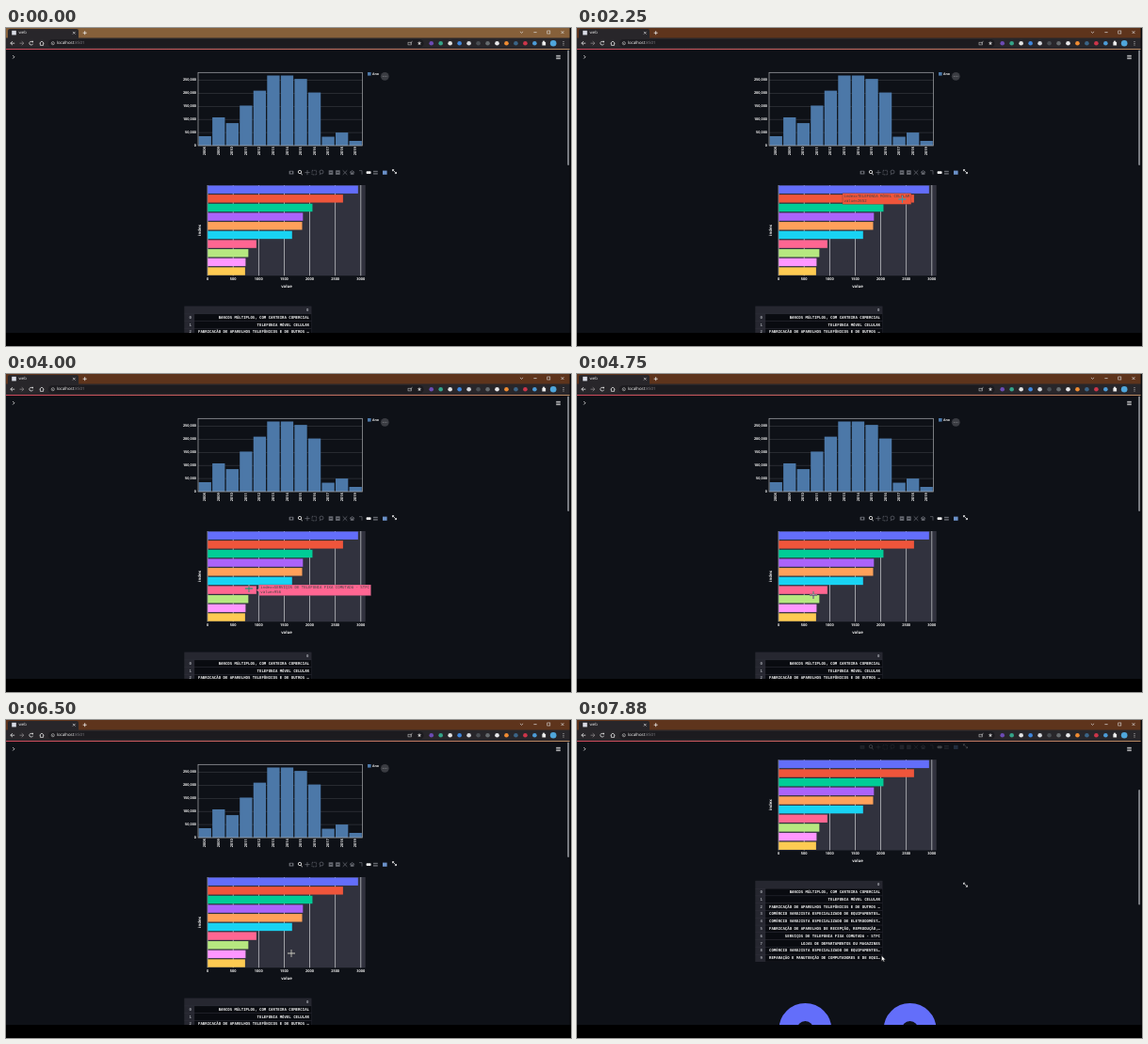
Animation, 600 px wide and 338 px high, one loop 8 s. Source, as an HTML page with a canvas:

```html
<!DOCTYPE html>
<html lang="pt">
<head>
<meta charset="utf-8">
<title>web</title>
<style>
html, body { margin: 0; width: 100%; height: 100%; overflow: hidden; background: #000; }
canvas { display: block; width: 600px; height: 338px; }
</style>
</head>
<body>
<canvas id="stage"></canvas>
<script>
const LOOP = 8000, STEP = 125;
const SANS = '"Open Sans", "Noto Sans", sans-serif';
const MONO = '"DejaVu Sans Mono", monospace';
const canvas = document.getElementById('stage');
const ctx = canvas.getContext('2d');
const dpr = window.devicePixelRatio || 1;
canvas.width = 600 * dpr;
canvas.height = 338 * dpr;
ctx.textRendering = 'geometricPrecision';

const SHOP = 'COMÉRCIO VAREJISTA ESPECIALIZADO DE ';
const MAKER = 'FABRICAÇÃO DE APARELHOS ';
const sectors = [
  ['BANCOS MÚLTIPLOS, COM CARTEIRA COMERCIAL', 2946, '#636efa'],
  ['TELEFONIA MÓVEL CELULAR', 2652, '#ef553b'],
  [MAKER + 'TELEFÔNICOS E DE OUTROS EQUIPAMENTOS DE COMUNICAÇÃO', 2054, '#00cc96'],
  [SHOP + 'EQUIPAMENTOS DE TELEFONIA E COMUNICAÇÃO', 1867, '#ab63fa'],
  [SHOP + 'ELETRODOMÉSTICOS E EQUIPAMENTOS DE ÁUDIO E VÍDEO', 1852, '#ffa15a'],
  [MAKER + 'DE RECEPÇÃO, REPRODUÇÃO, GRAVAÇÃO E AMPLIFICAÇÃO DE SOM', 1655, '#19d3f3'],
  ['SERVIÇOS DE TELEFONIA FIXA COMUTADA - STFC', 956, '#ff6692'],
  ['LOJAS DE DEPARTAMENTOS OU MAGAZINES', 799, '#b6e880'],
  [SHOP + 'EQUIPAMENTOS E SUPRIMENTOS DE INFORMÁTICA', 745, '#ff97ff'],
  ['REPARAÇÃO E MANUTENÇÃO DE COMPUTADORES E DE EQUIPAMENTOS PERIFÉRICOS', 735, '#fecb52']
];
// thousands per year from 2008
const counts = [36, 108, 86, 153, 210, 268, 268, 255, 203, 34, 50, 18];
// time, x, y
const mouseKeys = [
  [1000, 392, 215], [2000, 353, 181], [2750, 330, 184], [3250, 291, 199],
  [3625, 268, 221], [4000, 258, 228], [4500, 258, 211], [4750, 251, 235],
  [5250, 272, 258], [5875, 276, 222], [6500, 303, 248], [7250, 309, 245],
  [7875, 323.5, 250.5]
];
const wheelTimes = [6750, 7250, 7375, 7500];

const clamp01 = v => Math.min(1, Math.max(0, v));
const ease = v => { const k = clamp01(v); return k * k * (3 - 2 * k); };
const scrollAt = t => wheelTimes.reduce((sum, w) => sum + 31.2 * ease((t - w) / 250), 0);

function mouseAt(t) {
  const i = mouseKeys.findIndex(k => k[0] >= t);
  if (i < 1) return mouseKeys.at(i).slice(1);
  const [a, b] = [mouseKeys[i - 1], mouseKeys[i]];
  const k = (t - a[0]) / (b[0] - a[0]);
  return [a[1] + (b[1] - a[1]) * k, a[2] + (b[2] - a[2]) * k];
}

function rect(x, y, w, h, c) { ctx.fillStyle = c; ctx.fillRect(x, y, w, h); }
function round(x, y, w, h, r, c) {
  ctx.fillStyle = c;
  ctx.beginPath(); ctx.roundRect(x, y, w, h, r); ctx.fill();
}
function disc(x, y, r, c) {
  ctx.fillStyle = c;
  ctx.beginPath(); ctx.arc(x, y, r, 0, 7); ctx.fill();
}
function ring(x, y, r, c, w = 0.7, from = 0, to = 7) {
  ctx.strokeStyle = c; ctx.lineWidth = w;
  ctx.beginPath(); ctx.arc(x, y, r, from, to); ctx.stroke();
}
function box(x, y, w, h, c, lw = 0.7) {
  ctx.strokeStyle = c; ctx.lineWidth = lw; ctx.strokeRect(x, y, w, h);
}
// each path is a flat list of x,y pairs relative to (x, y)
function lines(x, y, c, w, ...paths) {
  ctx.strokeStyle = c; ctx.lineWidth = w;
  ctx.beginPath();
  for (const p of paths)
    for (let i = 0; i < p.length; i += 2)
      ctx[i ? 'lineTo' : 'moveTo'](x + p[i], y + p[i + 1]);
  ctx.stroke();
}
function plus(x, y, r, c, w = 0.8) { lines(x, y, c, w, [-r, 0, r, 0], [0, -r, 0, r]); }
function times(x, y, r, c, w = 0.7) { lines(x, y, c, w, [-r, -r, r, r], [r, -r, -r, r]); }
function dots(x, y, dx, dy, r, c) {
  for (let i = -1; i < 2; i++) disc(x + i * dx, y + i * dy, r, c);
}
function text(s, x, y, size, c, align = 'left', font = SANS, weight = 'bold') {
  ctx.font = `${weight} ${size}px ${font}`;
  ctx.fillStyle = c; ctx.textAlign = align; ctx.textBaseline = 'middle';
  ctx.fillText(s, x, y);
}
function upright(s, x, y, size, c) {
  ctx.save();
  ctx.translate(x, y); ctx.rotate(-Math.PI / 2);
  text(s, 0, 0, size, c, 'center');
  ctx.restore();
}
function expand(x, y) {
  lines(x, y, '#eee', 0.8, [-2, -2, 2, 2], [-2, -0.4, -2, -2, -0.4, -2], [2, 0.4, 2, 2, 0.4, 2]);
}

function yearChart() {
  for (let i = 0; i < 6; i++) {
    const y = 125 - i * 13.9;
    rect(204, y - 0.3, 174.5, 0.6, '#3a3d44');
    text(i ? i * 50 + ',000' : '0', 202, y, 3.8, '#eee', 'right');
  }
  counts.forEach((n, i) => {
    const x = 204 + i * 14.54;
    rect(x + 0.6, 125 - n * 0.278, 13.3, n * 0.278, '#4c78a8');
    upright(2008 + i, x + 7.3, 130.8, 3.9, '#eee');
  });
  box(204, 47.3, 174.5, 77.7, '#a9abb0');
  rect(384, 47, 3.6, 3.6, '#4c78a8');
  text('Ano', 389, 49, 3.6, '#eee');
  disc(402.3, 51.3, 4.4, '#3a3c42');
  dots(402.3, 51.3, 1.8, 0, 0.55, '#85878c');
}

function modebar() {
  const dim = '#666971', y = 153.6;
  round(300.6, 151.8, 4.8, 3.8, 0.6, dim); disc(303, y, 1.1, '#0e1117');
  ring(312, 153, 1.7, '#ddd', 0.9); lines(312, y, '#ddd', 1, [1, 0.8, 2.7, 2.4]);
  plus(320, y, 2.6, dim);
  ctx.setLineDash([1, 0.7]);
  box(325, 151.3, 4.6, 4.6, dim, 0.8);
  ctx.setLineDash([]);
  ring(335, 153, 2, dim); lines(335, y, dim, 0.7, [-1, 1.2, -2, 2.6]);
  for (const x of [345, 352.4]) {
    rect(x - 2.3, 151.3, 4.6, 4.6, dim);
    rect(x - 1.3, y - 0.3, 2.6, 0.6, '#0e1117');
  }
  times(360, y, 2.3, dim, 0.8);
  rect(365.8, 153.4, 3.6, 2.4, dim);
  lines(367.6, y, dim, 1, [-2.6, 0, 0, -2, 2.6, 0]);
  lines(377, y, dim, 0.7, [-2, -2, 1, -2, 1, 2]);
  round(382.6, 152.2, 5, 2.9, 0.8, '#eee');
  rect(390, 151.8, 4.8, 1.4, dim); rect(390, 154.2, 4.8, 1.4, dim);
  rect(400, 151.6, 4.6, 4.2, '#6a90c8');
  expand(412.5, 152.6);
}

const barY = i => 171.7 + i * 9.65;
const valueX = v => 214 + v * 0.05426;

function sectorChart() {
  rect(214, 167, 167.7, 96.3, '#31323e');
  for (let v = 0; v <= 3000; v += 500) {
    rect(valueX(v) - 0.3, 167, 0.7, 96.3, '#d0d1d5');
    text(v, valueX(v), 266.6, 3.9, '#eee', 'center');
  }
  sectors.forEach(([, value, color], i) => {
    rect(214.3, barY(i) - 4.2, valueX(value) - 214.3, 8.4, color);
  });
  text('value', 298, 274.8, 4.3, '#eee', 'center');
  upright('index', 205.5, 215, 4.3, '#eee');
}

function tooltip(x, y) {
  const i = sectors.findIndex(([, v], n) => x > 214 && x < valueX(v) && Math.abs(y - barY(n)) < 4.25);
  if (i < 0) return;
  const [label, value, color] = sectors[i];
  const line = 'index=' + label, w = line.length * 2.41 + 3;
  const end = valueX(value), cy = barY(i) + 0.2;
  const wide = w > 180, right = end + 3 + w < 408;
  let left = right ? end + 3 : end - 3 - w;
  if (wide) left = w > 200 ? 189 : 406 - w;
  rect(left, cy - 5.8, w, 11.6, color);
  box(left, cy - 5.8, w, 11.6, 'rgba(60,60,70,.55)', 0.5);
  if (!wide) {
    const edge = right ? left : left + w;
    ctx.fillStyle = color;
    ctx.beginPath();
    ctx.moveTo(edge, cy - 2); ctx.lineTo(end, cy); ctx.lineTo(edge, cy + 2);
    ctx.fill();
  }
  text(line, left + 1.5, cy - 2.4, 4, '#444', 'left', MONO, 'normal');
  text('value=' + value, left + 1.5, cy + 2.6, 4, '#444', 'left', MONO, 'normal');
}

function table() {
  rect(189.3, 295.6, 135.2, 86.2, '#262730');
  text('0', 321.5, 299.8, 4, '#a9abb3', 'right', MONO);
  sectors.forEach(([label], i) => {
    const y = 304 + i * 7.78;
    rect(200.2, y, 123.9, 7.5, '#090b10');
    rect(189.3, y - 0.2, 135.2, 0.3, '#363842');
    text(i, 195.8, y + 3.8, 4, '#a9abb3', 'center', MONO);
    const cut = label.length > 48 ? label.slice(0, 48) + '…' : label;
    text(cut, 322, y + 3.8, 4, '#f4f4f4', 'right', MONO);
  });
}

function donut(x) { ring(x, 453.8, 18.5, '#636efa', 19); }

function browser(focused) {
  const bar = '#28262a', y = 16.2, ink = '#dedede';
  rect(0, 0, 600, 11, focused ? '#5e341c' : '#86603a');
  round(2, 1, 75, 12, 2, bar);
  rect(0, 10.5, 600, 11.7, bar);
  rect(6.2, 2.8, 4.6, 4.6, '#d9dbe4');
  text('web', 13.5, 5.2, 4.3, '#e8e8e8', 'left', SANS, 'normal');
  times(72.3, 5.2, 1.3, '#ddd');
  plus(83.7, 5.2, 2, '#eee');
  lines(547.5, 4.5, '#ddd', 0.7, [-1.6, -0.7, 0, 0.8, 1.6, -0.7]);
  lines(562, 4.6, '#ddd', 0.7, [-1.6, 0, 1.6, 0]);
  box(574.8, 3, 3, 3, '#ddd', 0.6);
  times(591, 4.6, 1.4, '#ddd');

  lines(7, y, ink, 0.8, [2.2, 0, -2.2, 0], [0, -2, -2.2, 0, 0, 2]);
  lines(16.7, y, '#898587', 0.8, [-2.2, 0, 2.2, 0], [0, -2, 2.2, 0, 0, 2]);
  ring(26.7, y, 1.9, ink, 0.8, 0.3, 5.4);
  rect(27.5, 13.8, 1.5, 1.5, ink);
  lines(38, y, ink, 0.8, [-2.4, 0, 0, -2.2, 2.4, 0], [-1.6, -0.4, -1.6, 2.2, 1.6, 2.2, 1.6, -0.4]);
  round(45, 12, 398.5, 8.6, 4.3, '#1c1b1f');
  ring(49.8, y, 1.6, '#c5c5c5', 0.6);
  rect(49.5, 15.9, 0.6, 1.2, '#c5c5c5');
  text('localhost', 53.8, y, 4.4, '#fff', 'left', SANS, 'normal');
  const tw = ctx.measureText('localhost').width;
  text(':8501', 53.8 + tw, y, 4.4, '#86858a', 'left', SANS, 'normal');
  box(427, 15.2, 3.6, 2.7, '#b8b8b8', 0.6);
  lines(429, 15.4, '#b8b8b8', 0.7, [0, 1, 2.5, -1.2]);
  ctx.fillStyle = '#c8c8c8';
  ctx.beginPath();
  for (let i = 0; i < 10; i++) {
    const r = i % 2 ? 1 : 2.4, a = i * Math.PI / 5 - Math.PI / 2;
    ctx.lineTo(439 + r * Math.cos(a), y + r * Math.sin(a));
  }
  ctx.fill();
  ['#6c4bb4', '#35a488', '#e2e2e2', '#3f86dc', '#d4d7dc', '#4a4e53', '#666b6e',
    '#e8e8ea', '#ef8b32', '#3b6487', '#cc354a', '#4c9bd6'].forEach((c, i) => {
    disc(451.7 + i * 9.97, y, 2.3, c);
  });
  rect(569.4, 14.8, 3.7, 3.7, '#eee'); disc(571, 14.6, 1, '#eee');
  disc(581.2, y, 3.3, '#4fa6db');
  dots(592, y, 0, 1.7, 0.5, '#ddd');
}

function fixedParts(scroll) {
  const accent = ctx.createLinearGradient(0, 0, 600, 0);
  accent.addColorStop(0, '#cf4a5c');
  accent.addColorStop(1, '#b98a62');
  rect(0, 22, 600, 1, accent);
  lines(8, 30.8, '#eee', 0.8, [-0.8, -1.7, 0.9, 0, -0.8, 1.7]);
  for (let i = -1; i < 2; i++) rect(584.2, 30.6 + i * 1.7, 4.6, 0.8, '#eee');
  round(596.1, 23.5 + scroll * 0.405, 2, 122.5, 1, '#7d8086');
}

function cursor(x, y, arrow) {
  if (!arrow) {
    ctx.save();
    ctx.globalCompositeOperation = 'difference';
    plus(x, y, 4, '#fff');
    ctx.restore();
    return;
  }
  const p = [0, 0, 0, 5.8, 1.3, 4.6, 2.2, 6.6, 3.1, 6.2, 2.2, 4.2, 4, 4.2];
  ctx.beginPath();
  for (let i = 0; i < p.length; i += 2) ctx.lineTo(x + p[i], y + p[i + 1]);
  ctx.closePath();
  ctx.fillStyle = '#fff'; ctx.fill();
  ctx.strokeStyle = '#222'; ctx.lineWidth = 0.4; ctx.stroke();
}

function draw(t) {
  const scroll = scrollAt(t);
  const [mx, my] = mouseAt(t);
  const overTable = my + scroll > 285, pointing = t >= 1000;
  ctx.setTransform(dpr, 0, 0, dpr, 0, 0);
  rect(0, 0, 600, 338, '#0e1117');
  ctx.save();
  ctx.translate(0, -scroll);
  yearChart();
  ctx.globalAlpha = overTable ? Math.max(0.22, 1 - (t - 7250) / 450) : 1;
  modebar();
  ctx.globalAlpha = 1;
  sectorChart();
  table();
  if (overTable) expand(412.5, 300);
  donut(242.4);
  donut(353.6);
  if (pointing) tooltip(mx, my + scroll);
  ctx.restore();
  browser(t >= 500);
  fixedParts(scroll);
  rect(598.6, 0, 1.4, 338, '#08090c');
  rect(0, 324, 600, 14, '#000');
  if (pointing) cursor(mx, my, overTable);
}

const start = performance.now();
function tick() {
  const t = (performance.now() - start) % LOOP;
  draw(Math.floor(t / STEP) * STEP);
  requestAnimationFrame(tick);
}
tick();
</script>
</body>
</html>
```
